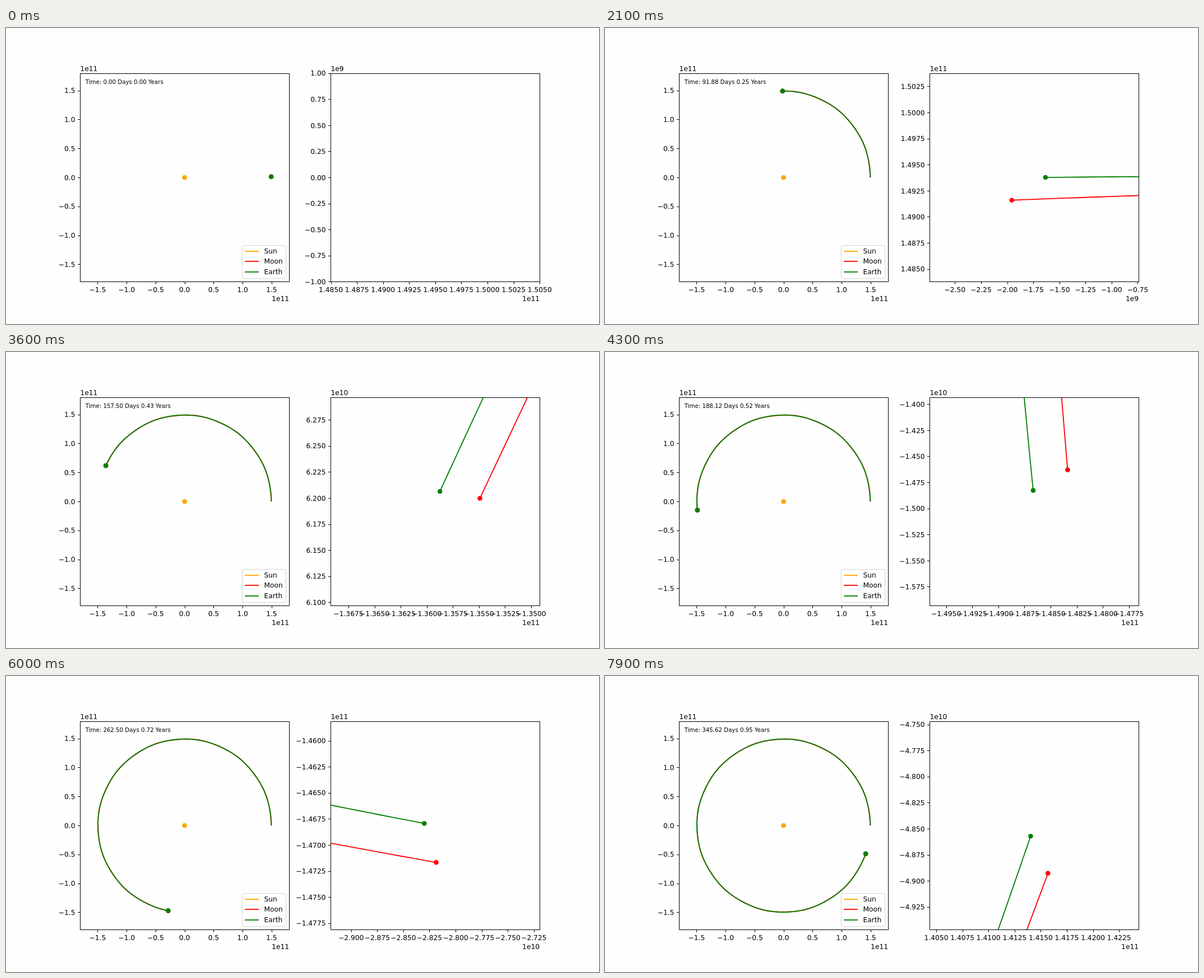
An HTML page with a canvas that plays this animation: 1058x529 px, repeating every 8000 ms.

```html
<!DOCTYPE html>
<html lang="en">
<head>
<meta charset="utf-8">
<title>Orbits</title>
<style>
html, body { margin: 0; width: 100%; height: 100%; overflow: hidden; background: #fefefe; }
canvas { display: block; width: 100vw; height: 100vh; }
</style>
</head>
<body>
<canvas id="stage" width="1058" height="529"></canvas>
<script>
const ctx = document.getElementById('stage').getContext('2d');
const STEP_MS = 100, STEPS = 80, HOURS_PER_STEP = 105;
const FONT = '"DejaVu Sans", sans-serif';
const RAD = Math.PI / 180;
const sin = deg => Math.sin(deg * RAD);
const cos = deg => Math.cos(deg * RAD);

// Positions in metres, t in days.
function earthAngle(t) {
  const mean = 0.0388 + 0.986838 * t;
  return mean + 0.0585 * sin(mean - 130);
}
function earthAt(t) {
  const angle = earthAngle(t);
  const r = 1.49447e11 * (1 + 5.1e-4 * cos(angle - 310));
  return [r * cos(angle), r * sin(angle)];
}

// Elliptic lunar orbit with solar variation and evection terms.
function moonAt(t) {
  const mean = 89.95 + 13.0919 * t;
  const anomaly = mean - 100 - 0.111 * t;
  const phase = 2 * (mean - earthAngle(t) - 180);
  const angle = mean + 2.23 * sin(anomaly) + 0.66 * sin(phase) + 0.45 * sin(phase - anomaly);
  const r = 3.853e8 * (1 - 0.0195 * cos(anomaly) - 0.0077 * cos(phase) - 0.0034 * cos(phase - anomaly));
  const [x, y] = earthAt(t);
  return [x + r * cos(angle), y + r * sin(angle)];
}

const hours = Array.from({ length: STEPS * HOURS_PER_STEP }, (_, h) => h / 24);
const bodies = [
  { color: 'red', at: moonAt, track: hours.map(moonAt) },
  { color: 'green', at: earthAt, track: hours.map(earthAt) }
];

// Plot panel: box edges, pixel centre, data centre and half range.
const HALF = 186.36, TOP = 81.5, BOTTOM = 453.5, CY = 267.3;
function panel(left, cx, center, range) {
  const scale = HALF / range;
  return {
    left, cx, center, range,
    x: v => cx + (v - center[0]) * scale,
    y: v => CY - (v - center[1]) * scale
  };
}

function text(str, x, y, align = 'left', size = 12.25) {
  ctx.font = `${size}px ${FONT}`;
  ctx.textAlign = align;
  ctx.fillStyle = '#000';
  ctx.fillText(str, x, y);
}
function line(x1, y1, x2, y2) {
  ctx.beginPath();
  ctx.moveTo(x1, y1);
  ctx.lineTo(x2, y2);
  ctx.stroke();
}
function dot(p, [x, y], color) {
  ctx.fillStyle = color;
  ctx.beginPath();
  ctx.arc(p.x(x), p.y(y), 4.3, 0, 2 * Math.PI);
  ctx.fill();
}
function trail(p, points, color) {
  ctx.strokeStyle = color;
  ctx.lineWidth = 1.84;
  ctx.lineJoin = 'round';
  ctx.beginPath();
  points.forEach(([x, y]) => ctx.lineTo(p.x(x), p.y(y)));
  ctx.stroke();
}

function ticksFor(center, range, step) {
  const first = Math.ceil((center - range) / step - 1e-6);
  const last = Math.floor((center + range) / step + 1e-6);
  const values = [];
  for (let i = first; i <= last; i++) values.push(i * step);
  const power = Math.floor(Math.log10(Math.max(...values.map(Math.abs))) + 1e-9);
  const digits = step > 1e10 ? 1 : power - 7;
  const label = v => (v / 10 ** power).toFixed(digits).replace('-', '\u2212');
  return { values, label, unit: '1e' + power };
}

function axes(p, step) {
  const xs = ticksFor(p.center[0], p.range, step);
  const ys = ticksFor(p.center[1], p.range, step);
  ctx.strokeStyle = '#000';
  ctx.lineWidth = 1;
  ctx.strokeRect(p.left, TOP, 373, BOTTOM - TOP);
  for (const v of xs.values) {
    const x = p.x(v), snapped = Math.round(x) + 0.5;
    line(snapped, BOTTOM, snapped, BOTTOM + 4.5);
    text(xs.label(v), x, 472, 'center');
  }
  for (const v of ys.values) {
    const y = p.y(v), snapped = Math.round(y - 0.3) + 0.5;
    line(p.left - 4.5, snapped, p.left, snapped);
    text(ys.label(v), p.left - 9, Math.round(y + 4.4), 'right');
  }
  text(xs.unit, p.left + 372.5, 488, 'right');
  text(ys.unit, p.left, 77);
}

function legend() {
  ctx.beginPath();
  ctx.roundRect(421.5, 388.5, 78, 59, 2.5);
  ctx.fillStyle = 'rgba(255,255,255,.8)';
  ctx.fill();
  ctx.strokeStyle = '#d4d4d4';
  ctx.lineWidth = 1;
  ctx.stroke();
  const rows = [['Sun', 'orange', 399], ['Moon', 'red', 417], ['Earth', 'green', 436]];
  for (const [name, color, y] of rows) {
    ctx.strokeStyle = color;
    ctx.lineWidth = 1.84;
    line(426.2, y, 451, y);
    text(name, 460.5, y + 4);
  }
}

// Two decimals, ties to even.
function twoDecimals(v) {
  const n = v * 100;
  let r = Math.round(n);
  if (r - n === 0.5 && r % 2) r--;
  return (r / 100).toFixed(2);
}

function draw(step) {
  const now = step * HOURS_PER_STEP;
  const days = now / 24;
  const wide = panel(132.5, 318.6, [0, 0], 1.8e11);
  const close = panel(579.5, 765.9, step ? earthAt(days) : [1.495e11, 0], 1e9);
  // Before any trail exists the markers sit at the end of the year.
  const shown = step ? (now - 1) / 24 : 365.4;

  ctx.fillStyle = '#fefefe';
  ctx.fillRect(0, 0, 1058, 529);
  for (const p of [wide, close]) {
    const start = p === close ? Math.max(0, now - 60) : 0;
    ctx.save();
    ctx.beginPath();
    ctx.rect(p.left, TOP, 373, BOTTOM - TOP);
    ctx.clip();
    for (const b of bodies) trail(p, b.track.slice(start, now), b.color);
    dot(p, [0, 0], 'orange');
    for (const b of bodies) dot(p, b.at(shown), b.color);
    ctx.restore();
  }
  axes(wide, 0.5e11);
  axes(close, 0.25e9);
  legend();
  text(`Time: ${twoDecimals(days)} Days ${(days / 365.25).toFixed(2)} Years`, 141.8, 100, 'left', 10.2);
}

let current = -1;
const begin = performance.now();
function tick() {
  const step = Math.floor((performance.now() - begin) / STEP_MS) % STEPS;
  if (step !== current) draw(current = step);
  requestAnimationFrame(tick);
}
tick();
</script>
</body>
</html>
```
